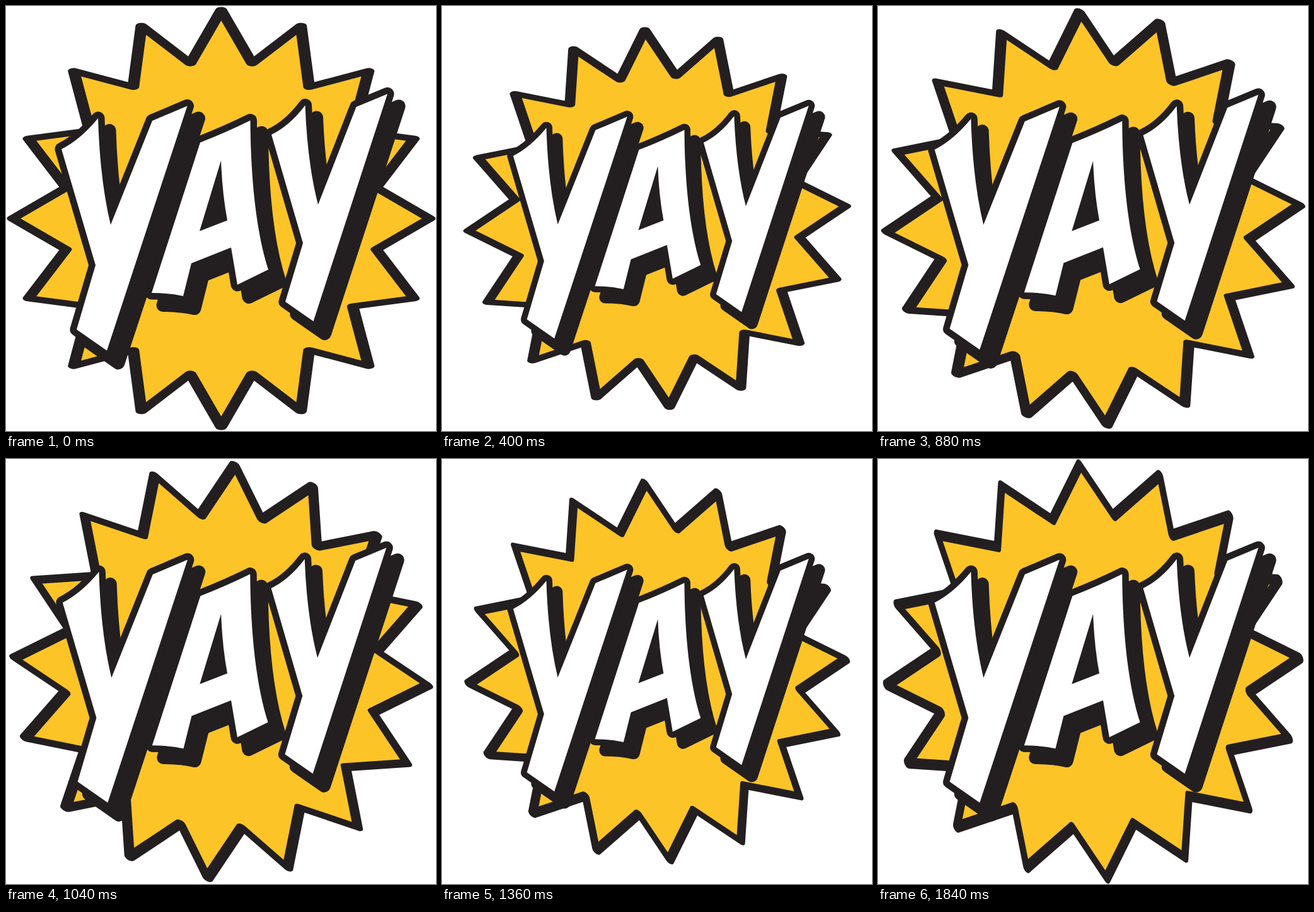
Write an HTML page that moves like this. It is 682x674 px and loops after 1.92 s.

```html
<!DOCTYPE html>
<html lang="en">
<head>
<meta charset="utf-8">
<title>Yay</title>
<style>
  html, body { margin: 0; width: 100%; height: 100%; overflow: hidden; background: #fff; }
  svg { display: block; width: 100%; height: 100%; }
</style>
</head>
<body>
<svg viewBox="0 0 682 674" role="img" aria-label="YAY">
  <defs>
    <g id="letters">
      <path d="M88 227Q118 212 146 178Q149 277 166 347L232 182L287.5 158.5L160 546.5L112 513L142 411Z"/>
      <path d="M308 216.5Q350 200 387.5 181.5C388 280 398 362 416 418L367 442L357 383L294 408L281 460Q258 455 231 455Z"/>
      <path d="M421 204Q450 190 474.5 157.5Q478 250 495 315L555.5 160L605 139.5L487.5 500L443 469L471 376Z"/>
    </g>
  </defs>
  <g id="burst">
    <path id="star" fill="#fdc428" stroke="#231f20" stroke-width="2" stroke-linejoin="round"/>
  </g>
  <g id="word">
    <g fill="#231f20" stroke="#231f20" stroke-width="21" stroke-linejoin="round">
      <use href="#letters" x="18" y="19.5"/>
      <use href="#letters"/>
    </g>
    <use href="#letters" fill="#fff"/>
    <path fill="#231f20" d="M341 245L307 357L351 340Q343 297 341 245Z"/>
  </g>
</svg>
<script>
const STEP = 80, STEPS = 24, TURN = 3.75;
const POINTS = 16, TIP = 330.7, VALLEY = 251;
const PEN = { x: 9.3, y: 4.8 };   // half axes of the elliptical outline pen
const byId = id => document.getElementById(id);
const burst = byId('burst'), star = byId('star'), word = byId('word');

// Star outline in the pen's own space, where the pen is a unit circle.
function starPath(degrees) {
  const corners = Array.from({ length: POINTS * 2 }, (_, i) => {
    const angle = (degrees + i * 180 / POINTS - 90) * Math.PI / 180;
    const radius = i % 2 ? VALLEY : TIP;
    return [radius * Math.cos(angle) / PEN.x, radius * Math.sin(angle) / PEN.y]
      .map(n => n.toFixed(3)).join(' ');
  });
  return `M${corners.join('L')}Z`;
}

function draw(time) {
  const step = Math.floor(time / STEP) % STEPS;
  const scale = 0.95 + 0.05 * Math.cos(step * Math.PI / 6);
  const pen = Math.max(0, step - 5) * TURN;
  star.setAttribute('d', starPath(step * TURN - pen));
  burst.setAttribute('transform',
    `translate(341.3 337) scale(${scale}) rotate(${pen}) scale(${PEN.x} ${PEN.y})`);
  word.setAttribute('transform',
    `translate(355 341) scale(${scale}) translate(-355 -341)`);
}

const start = performance.now();
function tick() {
  draw(performance.now() - start);
  requestAnimationFrame(tick);
}
draw(0);
requestAnimationFrame(tick);
</script>
</body>
</html>
```
